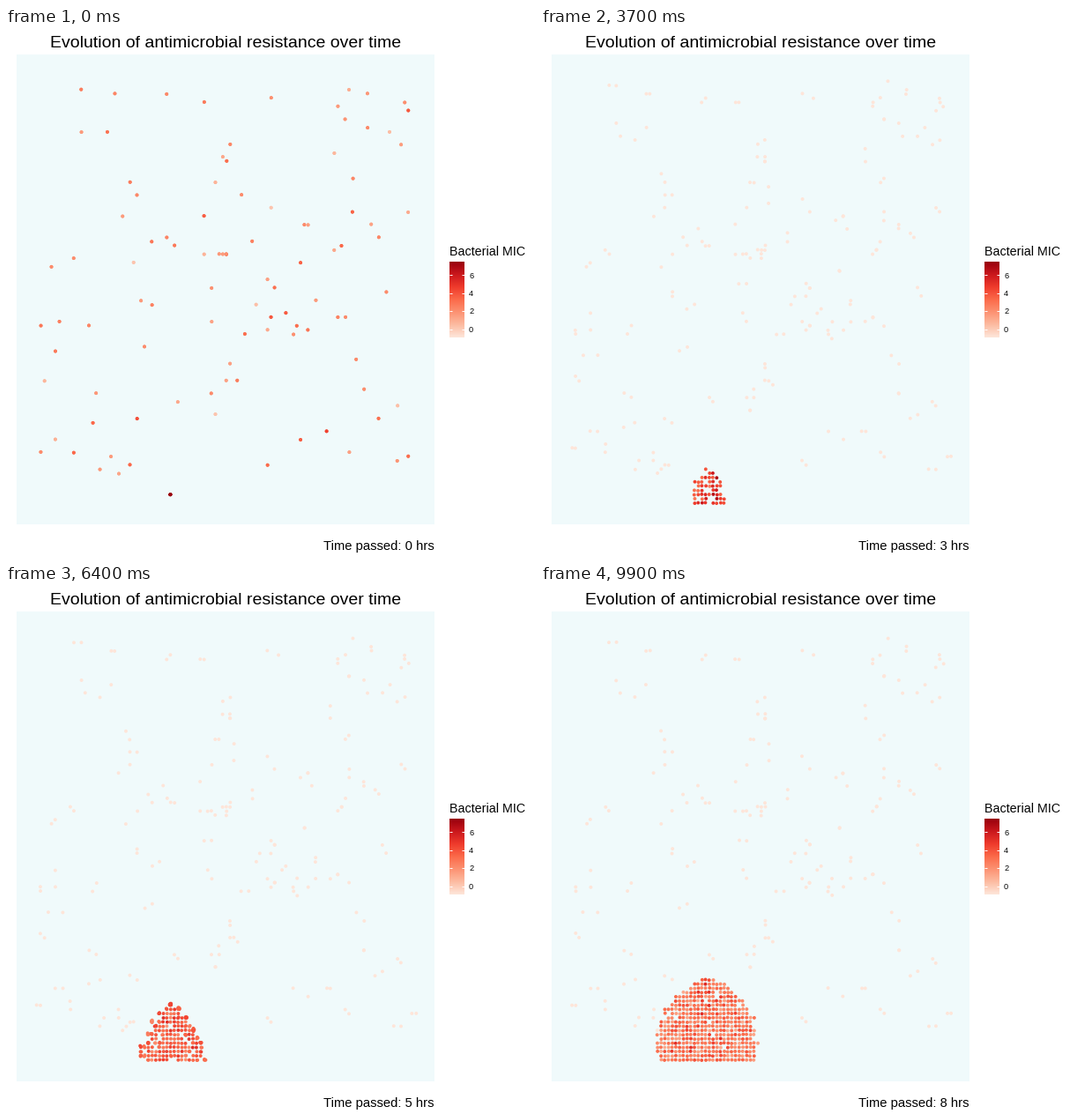
Recreate the animation shown at these times as a matplotlib script. Size 600x600 px, loop 10000 ms.

```python
import numpy as np
import matplotlib.pyplot as plt
from matplotlib.animation import FuncAnimation
from matplotlib.colors import LinearSegmentedColormap, Normalize
from matplotlib.patches import Rectangle

SIZE, DPI = 600, 100
FRAMES, HOURS = 100, 8
BACTERIA = 99
FOUNDER = (36, 2)
CENTRE = 36.5
DEAD, PEAK = -1, 7.4

reds = LinearSegmentedColormap.from_list("mic", [
    "#fee5d9", "#fcbba1", "#fc9272", "#fb6a4a", "#ef3b2c", "#cb181d", "#99000d"])
norm = Normalize(DEAD, PEAK)
rng = np.random.default_rng(7)


def to_px(cells):
    """Grid cells to pixels, with a little jitter."""
    cells = np.asarray(cells, float)
    xy = np.column_stack([35.0 + 4.215 * cells[:, 0],
                          538.7 - 4.784 * cells[:, 1]])
    return xy + rng.uniform(-0.4, 0.4, xy.shape)


def colour(mic):
    return reds(norm(np.clip(mic, DEAD, PEAK)))


def colony(hour):
    """Occupied cells of the resistant colony and their MIC values."""
    if hour == 0:
        return np.array([FOUNDER]), np.array([PEAK])
    half = 1.7 * hour - 0.2
    top = 2.2 * hour + 2.4
    bulge = 1.8 + 1.6 * (hour / HOURS) ** 3
    col, row = (g.ravel() for g in np.meshgrid(np.arange(18, 56), np.arange(23)))
    edge = half * (1 - (row / top) ** bulge)
    ragged = rng.uniform(-1, 1, col.size) * min(1, half / 7)
    inside = (np.abs(col - CENTRE) < edge + ragged) & (row < top)
    inside &= rng.random(col.size) < 1 - np.exp(-hour / 2)
    cells = rng.permutation(np.column_stack([col, row])[inside])
    closeness = 1 - np.abs(cells[:, 0] - CENTRE) / (half + 1)
    mean = 2.1 + 5.2 * np.exp(-hour / 3) + 0.6 * closeness
    return cells, np.maximum(rng.normal(mean, 0.95), 1)


def nearest(cells, parents):
    gap = np.linalg.norm(cells[:, None] - parents[None], axis=2)
    return np.argmin(gap + rng.uniform(0, 1, gap.shape), axis=1)


# Each susceptible cell divides once; both daughters wander two steps and die
starts = np.column_stack([rng.integers(1, 101, BACTERIA),
                          rng.integers(7, 100, BACTERIA)])
start_mic = np.clip(rng.normal(2.2, 1.1, BACTERIA), 0.1, 4.4)
steps = rng.integers(-1, 2, (2 * BACTERIA, 2, 2)).sum(axis=1)
settled = np.clip(np.repeat(starts, 2, axis=0) + steps, 0, (102, 101))
pairs = np.arange(2 * BACTERIA)

# Each state holds positions, colours and each dot's index in the state before
states = []
previous = None
for hour in range(HOURS + 1):
    cells, mic = colony(hour)
    if hour == 0:
        loose = np.repeat(to_px(starts), 2, axis=0)
        loose_mic = np.repeat(start_mic, 2)
        parent = np.zeros(1, int)
    else:
        loose, loose_mic = to_px(settled), np.full(len(pairs), DEAD)
        parent = nearest(cells, previous)
    states.append((np.vstack([loose, to_px(cells)]),
                   np.vstack([colour(loose_mic), colour(mic)]),
                   np.concatenate([pairs, len(pairs) + parent])))
    previous = cells

fig = plt.figure(figsize=(SIZE / DPI, SIZE / DPI), dpi=DPI, facecolor="white")
ax = fig.add_axes([0, 0, 1, 1])
ax.axis("off")


def label(x, y, text, px, ha="left"):
    return ax.text(x, y, text, fontsize=px * 72 / DPI, ha=ha, va="baseline",
                   family="Liberation Sans", color="black")


ax.add_patch(Rectangle((12, 30), 474, 532.5, fc="#f0fafb", ec="none"))
label(249.5, 22, "Evolution of antimicrobial resistance over time", 19.5, "center")
caption = label(486, 592, "", 14.7, "right")

label(503, 258, "Bacterial MIC", 14.3)
ax.imshow(np.linspace(1, 0, 256)[:, None], cmap=reds, aspect="auto",
          extent=(503, 520, 351, 265), zorder=1)
for value in (0, 2, 4, 6):
    y = 341.5 - 10.2 * value
    for x in (503, 516.6):
        ax.plot([x, x + 3.4], [y, y], color="white", lw=0.72,
                solid_capstyle="butt", zorder=2)
    label(525, y + 3.3, str(value), 9.2)

dots = ax.scatter([], [], s=(3.9 * 72 / DPI) ** 2, linewidths=0, zorder=3)
ax.set_xlim(0, SIZE)
ax.set_ylim(SIZE, 0)


def update(frame):
    time = HOURS * frame / (FRAMES - 1)
    hour = min(int(time), HOURS - 1)
    f = time - hour
    xy0, rgb0, _ = states[hour]
    xy1, rgb1, parent = states[hour + 1]
    dots.set_offsets(xy0[parent] * (1 - f) + xy1 * f)
    dots.set_facecolors(rgb0[parent] * (1 - f) + rgb1 * f)
    caption.set_text(f"Time passed: {round(time)} hrs")
    return dots, caption


anim = FuncAnimation(fig, update, frames=FRAMES, interval=100,
                     repeat=True, repeat_delay=0, blit=False)
plt.show()
```
